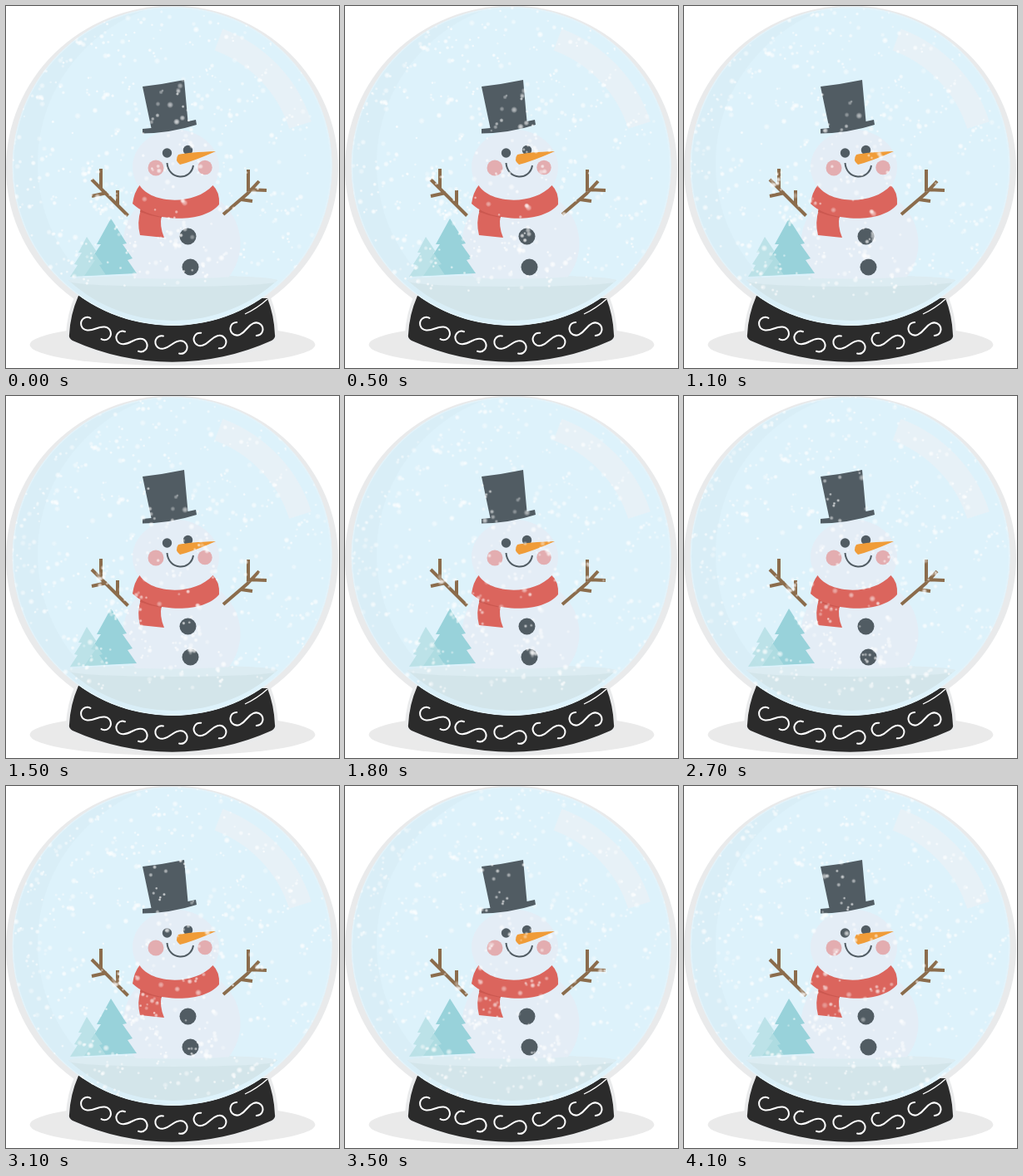
An HTML page for the animation above (4.2 s loop, 400 by 436 pixels).

```html
<!DOCTYPE html>
<html lang="en">
<head>
<meta charset="utf-8">
<title>Snow globe</title>
<style>
html, body { margin: 0; width: 100%; height: 100%; overflow: hidden; background: #fff; }
svg { display: block; width: 400px; height: 436px; }
.curls { fill: none; stroke: #fff; stroke-width: 2; stroke-linecap: round; }
.twigs { fill: none; stroke: #8b6c4c; stroke-width: 4; }
.dark { fill: #515c63; }
</style>
</head>
<body>
<svg viewBox="0 0 400 436">
  <defs>
    <radialGradient id="soft">
      <stop offset="0" stop-color="#fff" stop-opacity="1"/>
      <stop offset=".45" stop-color="#fff" stop-opacity=".75"/>
      <stop offset="1" stop-color="#fff" stop-opacity="0"/>
    </radialGradient>
    <clipPath id="glass"><circle cx="199.5" cy="193" r="192"/></clipPath>
    <clipPath id="bowl"><circle cx="200.5" cy="193" r="186"/></clipPath>
    <clipPath id="stand"><path d="M120 140H300V324Q210 332 120 326Z"/></clipPath>
    <path id="curl" d="M-9-11C-16-13-21-6-18 0C-14 7-6 4 0 0C6-4 14-7 18 0C21 6 16 13 9 11"/>
    <path id="base" d="M87 349Q77 372 76 396Q75 400 80 403A290 290 0 0 0 319 403Q324 400 323 396Q322 372 314 352Z"/>
  </defs>

  <ellipse cx="200" cy="408" rx="171.5" ry="25" fill="#eaeaea"/>
  <ellipse cx="199.5" cy="195" rx="199.5" ry="195.5" fill="#e9eaeb"/>
  <use href="#base" fill="none" stroke="#e9eaeb" stroke-width="8"/>
  <use href="#base" fill="#2b2b2b"/>
  <path d="M287 371Q302 364 314 353" fill="none" stroke="#fff" stroke-width="1.3"/>

  <g clip-path="url(#glass)">
    <circle cx="199.5" cy="193" r="192" fill="#d9eef7"/>
    <circle cx="235" cy="190" r="197" fill="#ddf2fb"/>
    <g clip-path="url(#bowl)">
      <path d="M60 330H340V390H60Z" fill="#d3e5ea"/>
      <ellipse cx="201" cy="331" rx="127" ry="7" fill="#dcecf2"/>
    </g>
    <circle cx="199.5" cy="193" r="191.3" fill="none" stroke="#e4f3fa" stroke-width="1.5"/>
    <path d="M255.5 40.5A162 162 0 0 1 353.5 143.5" fill="none" stroke="#e7f1f7" stroke-width="28"/>
  </g>

  <g fill="#e4edf6" clip-path="url(#stand)">
    <ellipse cx="211" cy="286" rx="70.5" ry="68"/>
    <ellipse cx="204" cy="194" rx="52" ry="45"/>
  </g>

  <path d="M126 256L145 286L140 287L152 304L146 306L157 322L94 325L107 306L102 305L114 287L109 287Z" fill="#98d2da"/>
  <path d="M97 278L109 296L106 297L116 311L112 312L120 324L77 326L86 312L82 311L91 297L87 297Z" fill="#b5dfe4" fill-opacity=".8"/>

  <g class="twigs">
    <path d="M146.5 252.5L116 222L103 209M114 196V221M103 229L121 225M134 222V239"/>
    <path d="M261 251L290 226L304 211M291 197V225M289 221L313 222M282 233L296 235"/>
  </g>

  <path d="M162 245Q157 261 161 276L190 279Q184 265 187 252Z" fill="#db655d"/>
  <path d="M161 248Q174 253 187 255L187 251L162 242Z" fill="#cb5850"/>
  <path d="M160.5 216C174 238 226 241 248.5 216Q257 224 256 239C237 263 174 260 152 238Q154 224 160.5 216Z" fill="#db655d"/>

  <g class="dark">
    <path d="M164 97Q190 94 214 89L218.5 139L228 137L229 143Q198 153 164 153.5V148L174.5 147Z"/>
    <circle cx="193.5" cy="177" r="5.7"/>
    <circle cx="218.5" cy="173.5" r="5.7"/>
    <circle cx="218.5" cy="277.5" r="10"/>
    <circle cx="221.5" cy="314.5" r="10"/>
  </g>
  <path d="M193.5 189C195 210 222 211 225 192" fill="none" stroke="#515c63" stroke-width="2"/>
  <circle cx="180" cy="195" r="9.5" fill="#e3adb0"/>
  <circle cx="239" cy="194.5" r="8.7" fill="#e3adb0"/>
  <path d="M207 179Q220 176 252 175Q225 187 209 191Q202 186 207 179Z" fill="#f09c38"/>

  <g class="curls">
    <use href="#curl" transform="translate(108 388.5) rotate(12)"/>
    <use href="#curl" transform="translate(151 404) rotate(5)"/>
    <use href="#curl" transform="translate(198.5 408) rotate(-3)"/>
    <use href="#curl" transform="translate(245 403) rotate(-10)"/>
    <use href="#curl" transform="translate(289 389) rotate(-17)"/>
  </g>
  <g clip-path="url(#glass)"><g id="snow" fill="url(#soft)"></g></g>
</svg>
<script>
const LOOP = 4200, STEPS = 42, DRIFT = 50, COUNT = 900;
const LEFT = -55, TOP = -55, WIDTH = 425, HEIGHT = 392;
const snow = document.getElementById('snow');

let seed = 2718;
const rand = () => (seed = (seed * 16807) % 2147483647) / 2147483647;
const spread = size => (rand() * 2 - 1) * size;

function addFlake(x, y) {
  const flake = document.createElementNS(snow.namespaceURI, 'circle');
  const set = (name, value) => flake.setAttribute(name, value.toFixed(2));
  set('cx', x);
  set('cy', y);
  set('r', 1.8 + rand() ** 2 * 2.4);
  set('opacity', 0.35 + rand() * 0.5);
  snow.append(flake);
}

// Snow thins out to the right; some flakes gather near the one before.
let x = 0, y = 0;
for (let i = 0; i < COUNT; i++) {
  if (rand() < 0.35) {
    x += spread(10);
    y = Math.min(y + spread(10), TOP + HEIGHT);
  } else {
    x = LEFT + WIDTH * rand() ** 1.2;
    y = TOP + HEIGHT * rand();
  }
  addFlake(x, y);
}

snow.animate(
  { transform: ['translate(0px, 0px)', `translate(${DRIFT}px, ${DRIFT}px)`] },
  { duration: LOOP, iterations: Infinity, easing: `steps(${STEPS}, end)` }
);
</script>
</body>
</html>
```
